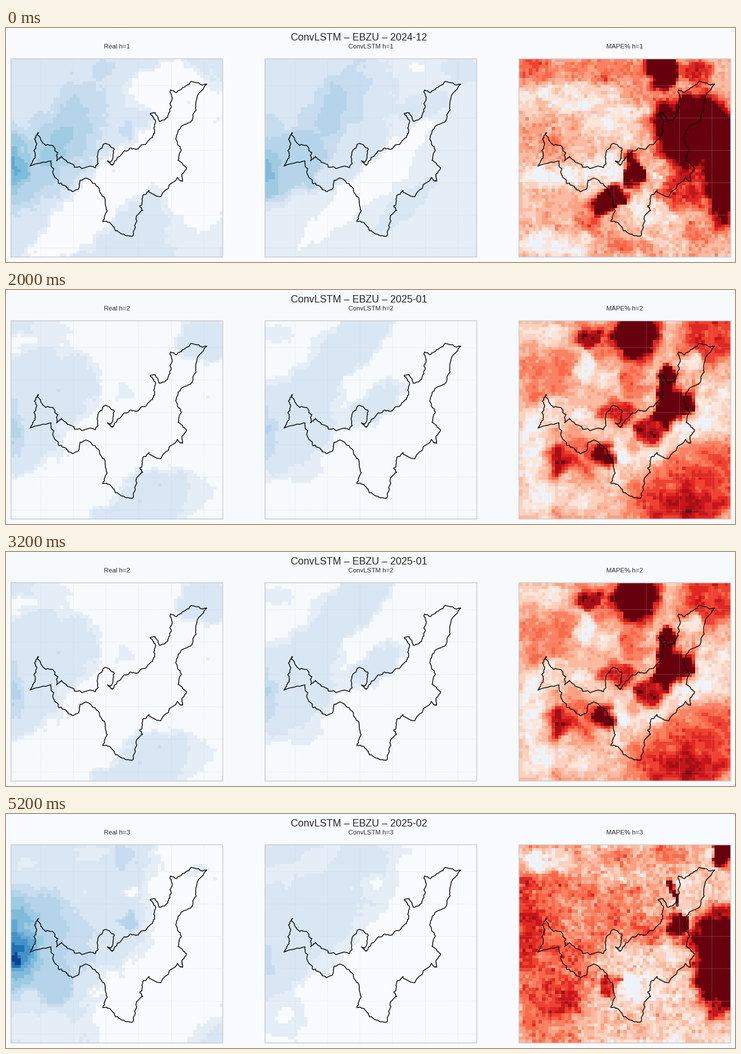
A matplotlib script that plays this animation: 1280 by 412 pixels, repeating every 6000 ms.

```python
import numpy as np
import matplotlib.pyplot as plt
from matplotlib.animation import FuncAnimation

W, H, DPI = 1280, 412, 100
PX = 72 / DPI
COLS, ROWS = 65, 61
LEFT, STEP, WIDTH, TOP, BOTTOM = 8.75, 446, 371.75, 54.25, 403.25
CELL = WIDTH / COLS

PAPER = [(249, 251, 255), (246, 250, 253), (248, 251, 255)]
BLUES = [(229, 237, 247), (217, 230, 244), (199, 220, 239), (181, 212, 233),
         (157, 203, 225), (128, 187, 218), (98, 168, 211), (66, 146, 198),
         (33, 113, 181), (8, 69, 148)]
REDS = [(238, 243, 250), (254, 229, 217), (253, 209, 191), (252, 187, 161),
        (252, 161, 130), (251, 129, 98), (250, 104, 74), (239, 66, 49),
        (222, 40, 35), (198, 22, 26), (165, 15, 21), (103, 0, 13)]


class Field:
    """A cell map built from elliptic blobs with ragged edges."""

    def __init__(self, seed, base, edge):
        self.rng = np.random.default_rng(seed)
        self.edge = edge
        self.v = np.full((ROWS, COLS), float(base))
        y, x = np.mgrid[:ROWS, :COLS] + 0.5
        self.x, self.y = x + 0.8 * self.cloud(), y + 0.8 * self.cloud()

    def cloud(self):
        """Smooth noise of unit spread."""
        n = self.rng.normal(size=(ROWS, COLS))
        for axis in (0, 1, 0, 1):
            n = n + np.roll(n, 1, axis) + np.roll(n, -1, axis)
        return n / n.std()

    def blob(self, level, x, y, rx, ry, tilt=0):
        c, s = np.cos(np.radians(tilt)), np.sin(np.radians(tilt))
        dx, dy = self.x - x, self.y - y
        d = np.hypot((dx * c + dy * s) / rx, (dy * c - dx * s) / ry)
        self.v += (level - self.v) * np.exp(-np.minimum(d, 3) ** self.edge)
        return self

    def stack(self, low, high, x, y, rx, ry, tilt=0):
        """Nested blobs that shrink evenly as the level rises."""
        for level in range(low, high + 1):
            k = 1 - (level - low) / (high - low + 1)
            self.blob(level, x, y, rx * k, ry * k, tilt)
        return self

    def paint(self, colours, grain, drift):
        v = np.minimum(self.v, len(colours) + 1) + drift * self.cloud()
        v = np.rint(v + self.rng.normal(0, grain, v.shape))
        return np.array(colours, np.uint8)[np.clip(v, 0, len(colours) - 1).astype(int)]


def blue(seed, base):
    return Field(seed, base, 10)


def red(seed, base):
    return Field(seed, base, 5)


REAL = [
    blue(1, 2)
    .blob(0, 47, 9, 12, 8, -15).blob(0, 57, 30, 15, 25).blob(0, 29, 42, 34, 8, -43)
    .blob(1, 57, 58, 10, 5).blob(2, 40, 51, 11, 8, -40).blob(2, 36, 59, 14, 4)
    .stack(3, 5, 14, 27, 24, 11, -54).stack(4, 7, 0, 33, 9, 13)
    .blob(3, 28, 3, 3, 4).blob(3, 35, 22, 3, 2),
    blue(2, 0)
    .blob(2, 12, 20, 15, 13, 10).blob(2, 2, 34, 15, 14, -30).blob(2, 2, 0, 7, 5)
    .blob(1, 13, 4, 7, 3).blob(2, 60, 6, 9, 8).blob(1, 49, 54, 14, 8, -20)
    .blob(2, 43, 55, 12, 9, -20).blob(2, 32, 60, 8, 3).blob(1, 35, 23, 3, 3)
    .stack(3, 4, 0, 34, 4, 10),
    blue(3, 2)
    .blob(0, 58, 20, 17, 34).blob(0, 44, 49, 23, 17, -25).blob(1, 9, 58, 13, 7)
    .blob(1, 57, 8, 4, 2, -20).blob(1, 24, 2, 5, 2).blob(1, 6, 6, 3, 2)
    .blob(0, 37, 14, 3, 2).blob(3, 34, 4, 3, 4).blob(3, 7, 29, 20, 16, 20)
    .blob(4, 6, 30, 12, 16).blob(4, 13, 41, 6, 9).stack(5, 9, 0, 31, 11, 15)
    .blob(9.6, 1, 36, 2, 2).blob(4, 36, 24, 4, 3),
]

PREDICTED = [
    blue(4, 1)
    .blob(2, 12, 14, 30, 28, -35).blob(0, 31, 39, 28, 5, -44).blob(2, 43, 45, 13, 4, -40)
    .blob(2, 60, 3, 7, 4).blob(2, 49, 14, 9, 4, -20).blob(0, 47, 3, 3, 2)
    .blob(3, 16, 24, 27, 8, -56).blob(3, 0, 30, 10, 14)
    .blob(4, 20, 17, 4, 9, 10).blob(4, 7, 32, 13, 9, -35).stack(5, 6, 0, 35, 4, 8),
    blue(5, 0)
    .blob(1, 13, 46, 6, 3, -35).blob(2, 27, 6, 18, 8, -50).blob(2, 7, 32, 20, 14, -45)
    .blob(1, 3, 4, 5, 3).blob(1, 33, 26, 13, 5, -35).blob(2, 34, 25, 9, 4, -35)
    .stack(3, 4, 0, 35, 3, 9),
    blue(6, 0)
    .blob(1, 6, 53, 8, 7).blob(0, 6, 53, 2.5, 2.5).blob(2, 8, 10, 38, 28, -45)
    .blob(2, 3, 38, 14, 9, -30).blob(1, 17, 4, 9, 3, -30).blob(1, 4, 9, 6, 3, -20)
    .blob(1, 34, 14, 6, 4).blob(0, 34, 13, 3, 1.3).blob(3, 0, 36, 1.5, 5),
]

ERROR = [
    red(7, 3)
    .blob(6, 4, 3, 7, 4).blob(5, 26, 3, 14, 4).blob(7, 25, 8, 3, 3).blob(5, 38, 10, 4, 6)
    .blob(1, 14, 12, 17, 4).blob(4, 9, 24, 10, 6).blob(1, 29, 22, 9, 7)
    .blob(0.5, 13, 36, 14, 4).blob(0.5, 28, 34, 5, 5).blob(6, 22, 49, 5, 5)
    .blob(1, 11, 57, 13, 4).blob(1, 42, 46, 8, 6).blob(5, 34, 58, 7, 3)
    .blob(8, 51, 40, 8, 6).blob(5, 56, 53, 5, 6)
    .blob(16, 44, 2, 5, 8).blob(16, 53, 22, 12, 12).blob(16, 63, 34, 6, 17)
    .blob(8, 54, 4, 5, 4).blob(16, 36, 34, 3.2, 5.5).blob(16, 27, 43, 6, 4, -25)
    .blob(0, 42, 36.5, 1.3, 1.3),
    red(8, 3)
    .blob(5, 10, 17, 10, 9).blob(1, 10, 4, 9, 3).blob(1, 20, 13, 3, 7)
    .blob(0.5, 29, 18, 5, 3).blob(1, 12, 29, 9, 4).blob(0, 4, 39, 4, 10)
    .blob(1, 8, 54, 7, 5).blob(1, 21, 55, 7, 4).blob(6, 28, 5, 12, 6)
    .blob(6, 35, 18, 4, 7).blob(8, 58, 5, 10, 9).blob(1, 53, 13, 4, 4)
    .blob(7, 56, 51, 25, 12, -25).blob(9, 51, 57, 12, 5).blob(6, 18, 41, 10, 5)
    .blob(1, 32, 43, 3, 7).blob(1, 45, 38, 12, 3, -35).blob(1, 60, 27, 7, 8)
    .blob(11, 22, 6, 3.5, 4, 45).blob(16, 36, 4, 6.5, 8).blob(9, 30, 28, 5, 4)
    .blob(16, 45, 18, 3, 5).blob(16, 47, 27, 8, 4, -40).blob(10, 39, 34, 4, 4)
    .blob(10, 13, 43, 4, 4).blob(11, 26, 42, 3, 5),
    red(9, 2)
    .blob(6, 9, 32, 16, 36).blob(5, 26, 21, 19, 10).blob(4.5, 33, 5, 10, 5)
    .blob(3, 24, 9, 7, 4).blob(1, 9, 5, 8, 4).blob(8, 2, 25, 6, 16)
    .blob(8, 13, 48, 6, 6).blob(7, 36, 15, 2, 2).blob(6, 39, 26, 6, 4)
    .blob(9, 27, 43, 3, 3).blob(0.5, 36, 44, 7, 6).blob(6, 45, 2, 5, 4)
    .blob(7, 51, 29, 5, 4).blob(16, 49, 25, 3.5, 3.5).blob(16, 47, 14, 0.8, 5)
    .blob(16, 63, 2, 4, 5).blob(16, 63.5, 36, 10, 17),
]

FRAMES = [(r.paint([paper] + BLUES, 0.12, 0.12), p.paint([paper] + BLUES, 0.08, 0.1),
           e.paint(REDS, grain, 0.6))
          for r, p, e, paper, grain in zip(REAL, PREDICTED, ERROR, PAPER, (0.6, 0.4, 0.8))]
MONTHS = ("2024-12", "2025-01", "2025-02")
LABELS = ("Real", "ConvLSTM", "MAPE%")

BORDER = [352, 99, 325, 94, 321, 100, 308, 108, 299, 114, 289, 109, 290, 137, 284, 157,
          272, 164, 262, 149, 253, 151, 262, 162, 261, 185, 250, 198, 232, 213,
          226, 213, 208, 216, 186, 242, 178, 234, 184, 236, 190, 214, 175, 203,
          163, 215, 157, 246, 120, 245, 97, 226, 89, 234, 91, 219, 82, 207, 70, 207,
          57, 184, 50, 196, 54, 203, 49, 216, 51, 229, 42, 243, 79, 234, 83, 257,
          92, 273, 104, 278, 116, 288, 128, 282, 130, 268, 140, 264, 164, 283,
          174, 303, 176, 319, 170, 341, 183, 343, 191, 354, 209, 365, 221, 367,
          227, 345, 229, 331, 240, 321, 235, 313, 240, 297, 251, 286, 264, 296,
          301, 263, 310, 270, 309, 258, 317, 246, 302, 233, 308, 215, 299, 192,
          306, 177, 328, 159, 333, 135, 352, 99]


def border_line():
    """Roughen the border by splitting and nudging its segments."""
    rng = np.random.default_rng(12)
    pts = np.reshape(BORDER, (-1, 2)).astype(float)
    for size in (0.07, 0.11, 0.16):
        a, b = pts[:-1], pts[1:]
        turn = (b - a)[:, ::-1] * [-1, 1]
        mid = (a + b) / 2 + turn * rng.normal(0, size, (len(a), 1))
        pts = np.vstack([np.stack([a, mid], 1).reshape(-1, 2), pts[-1:]])
    return pts.T


plt.rcParams["font.family"] = "Liberation Sans"
fig = plt.figure(figsize=(W / DPI, H / DPI), dpi=DPI)
ax = fig.add_axes([0, 0, 1, 1])
ax.axis("off")

images, titles = [], []
bx, by = border_line()
text = dict(color="#262626", ha="center", va="baseline")
for n, cells in enumerate(FRAMES[0]):
    left = LEFT + n * STEP
    right = left + WIDTH
    images.append(ax.imshow(cells, extent=(left, right, BOTTOM, TOP),
                            interpolation="nearest", aspect="auto", zorder=1))
    grid = dict(color="#c4ccd4", lw=0.6 * PX, ls="--", alpha=0.55, zorder=2)
    for k in range(6):
        gx, gy = left + (9.1 + 10 * k) * CELL, TOP + (8.1 + 10 * k) * CELL
        ax.plot([gx, gx], [TOP, BOTTOM], **grid)
        ax.plot([left, right], [gy, gy], **grid)
    ax.plot(bx + n * STEP, by, color="black", lw=1.4 * PX, zorder=3)
    ax.add_patch(plt.Rectangle((left, TOP), WIDTH, BOTTOM - TOP, fill=False,
                               ec="#cccccc", lw=1.5 * PX, snap=False, zorder=4))
    titles.append(ax.text(left + WIDTH / 2, 36, "", size=11.4 * PX, **text))
heading = ax.text(620, 21.5, "", size=17.6 * PX, **text)
ax.set_xlim(0, W)
ax.set_ylim(H, 0)


def update(i):
    fig.set_facecolor(np.array(PAPER[i]) / 255)
    heading.set_text(f"ConvLSTM – EBZU – {MONTHS[i]}")
    for image, title, cells, label in zip(images, titles, FRAMES[i], LABELS):
        image.set_data(cells)
        title.set_text(f"{label} h={i + 1}")
    return images + titles + [heading]


anim = FuncAnimation(fig, update, frames=3, interval=2000, repeat=True, repeat_delay=0)
plt.show()
```
